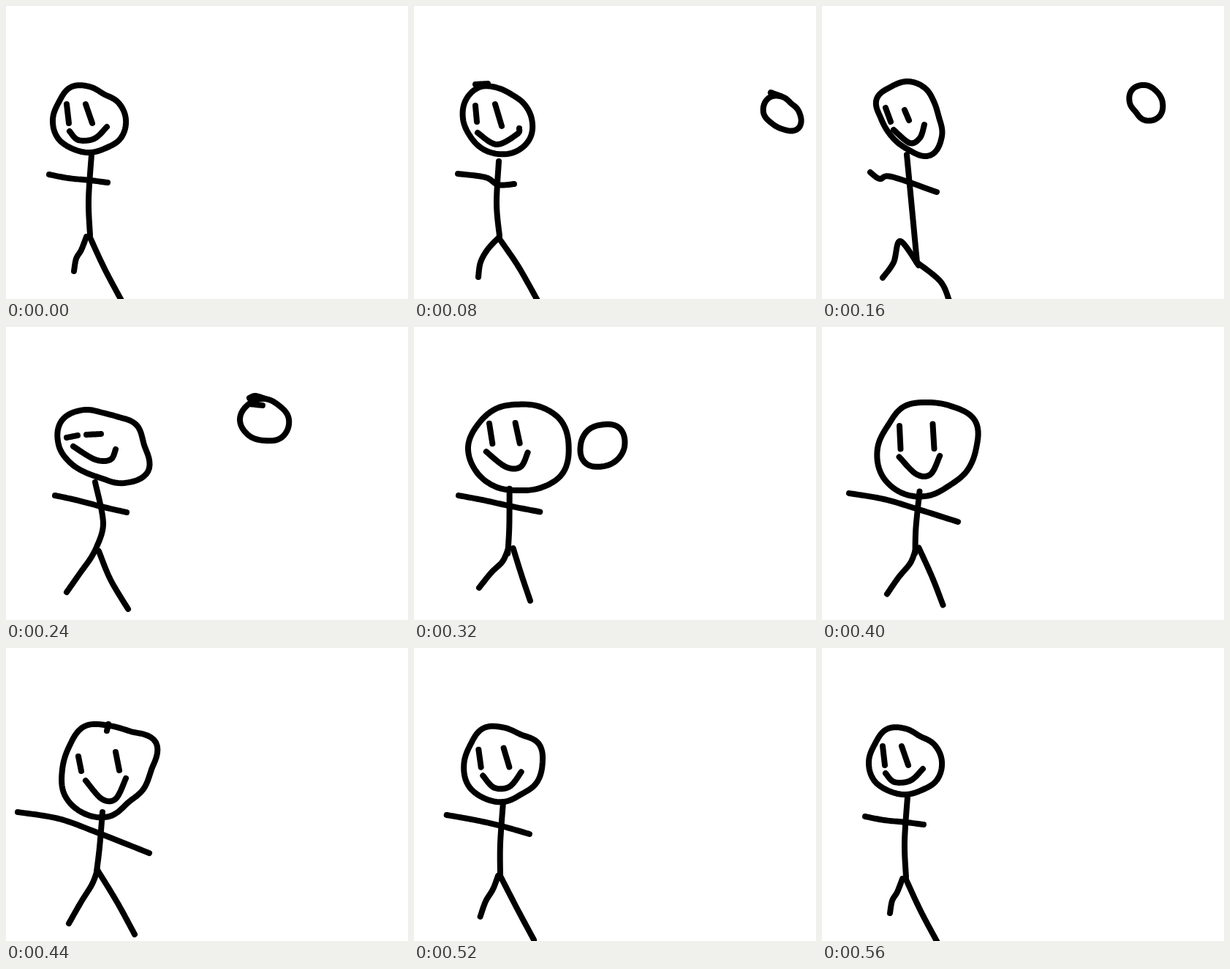
Animation of 550 by 400 pixels, one loop 1.2 s. Source, as an HTML page with a canvas:

```html
<!DOCTYPE html>
<html lang="en">
<head>
<meta charset="utf-8">
<title>Ball to the head</title>
<style>
html, body { margin: 0; width: 100%; height: 100%; overflow: hidden; background: #fff; }
canvas { display: block; width: 550px; height: 400px; }
</style>
</head>
<body>
<canvas id="stage" width="550" height="400"></canvas>
<script>
const LOOP = 1200, STEP = 40, END = 560;
const ctx = document.getElementById('stage').getContext('2d');

// Rings (head, ball, gasp): centre, then radii at equal angles, clockwise from the right.
// All other parts: the points of a smooth line.
const rest = {
  head: [114, 155, 50, 50, 45, 45, 46, 50, 50, 48, 51, 45, 40, 46],
  eyeL: [83, 134, 86, 160], eyeR: [109, 134, 118, 160],
  mouth: [87, 171, 99, 183, 121, 181, 138, 165],
  body: [117, 203, 113, 265, 115, 313],
  arms: [59, 230, 85, 235, 115, 238, 139, 241],
  legL: [110, 315, 103, 333, 96, 345, 93, 362],
  legR: [115, 316, 135, 359, 158, 402]
};
const ready = {
  head: [115, 154, 46, 51, 51, 48, 46, 45, 48, 51, 50, 42, 38, 41],
  eyeL: [84, 136, 86, 158], eyeR: [111, 134, 120, 164],
  mouth: [87, 173, 113, 189, 141, 175, 144, 167],
  body: [116, 212, 113, 270, 117, 314],
  arms: [60, 229, 98, 234, 115, 244, 137, 243],
  legL: [116, 316, 101, 332, 91, 350, 88, 370],
  legR: [117, 318, 143, 356, 169, 402],
  ball: [504, 145, 23, 31, 23, 21, 26, 27, 21, 17],
  marks: [[84, 107, 101, 106], [488, 118, 502, 123]]
};
const lean = {
  head: [118, 152, 42, 53, 60, 44, 36, 34, 38, 50, 48, 49, 46, 41],
  eyeL: [87, 139, 94, 158], eyeR: [113, 142, 119, 156],
  mouth: [98, 169, 120, 187, 134, 180, 140, 162],
  body: [116, 203, 123, 276, 130, 350],
  arms: [66, 227, 79, 236, 95, 233, 157, 254],
  legL: [132, 354, 107, 321, 98, 350, 83, 371],
  legR: [130, 350, 162, 376, 174, 402],
  ball: [442, 132, 24, 27, 24, 18, 21, 25, 24, 22]
};
const brace = {
  head: [132, 161, 57, 72, 60, 46, 44, 50, 60, 65, 55, 44, 44, 54],
  eyeL: [83, 151, 98, 148], eyeR: [110, 147, 130, 146],
  mouth: [92, 163, 122, 181, 143, 181, 150, 167],
  body: [122, 212, 133, 268, 123, 303],
  arms: [67, 230, 95, 236, 130, 245, 165, 253],
  legL: [123, 303, 115, 317, 102, 335, 83, 362],
  legR: [127, 306, 143, 345, 167, 385],
  ball: [354, 126, 33, 34, 29, 31, 34, 30, 28, 27],
  marks: [[333, 105, 351, 107], [333, 97, 341, 94, 355, 98]]
};
const hit = {
  head: [148, 165, 75, 70, 66, 66, 72, 75, 73, 62, 63, 65, 72, 76],
  eyeL: [113, 122, 112, 165], eyeR: [153, 123, 152, 165],
  body: [135, 225, 129, 275, 131, 312],
  arms: [58, 230, 97, 237, 136, 245, 176, 252],
  legL: [131, 305, 124, 322, 108, 335, 92, 353],
  legR: [140, 300, 149, 335, 155, 368],
  ball: [210, 178, 29, 26, 30, 36, 28, 27, 27, 35],
  gasp: [136, 185, 32, 32, 25, 31, 31, 27, 22, 24],
  marks: [[118, 110, 126, 100]]
};
const recoil = {
  head: [141, 166, 58, 54, 52, 64, 69, 70, 64, 63, 68, 60, 60, 74],
  eyeL: [99, 148, 103, 168], eyeR: [150, 142, 155, 167],
  mouth: [109, 181, 131, 206, 150, 206, 164, 178],
  body: [132, 224, 128, 272, 124, 305],
  arms: [16, 224, 72, 233, 125, 252, 196, 280],
  legL: [125, 303, 118, 322, 102, 348, 86, 376],
  legR: [125, 303, 152, 347, 176, 391],
  marks: [[138, 113, 140, 104]]
};
const [x, y, ...radii] = ready.ball;
const entry = { ball: [x + 45, y + 13, ...radii] };
const keys = [[0, rest], [40, entry], [80, ready], [160, lean], [240, brace],
  [360, hit], [440, recoil], [END, rest]];
const lines = ['eyeL', 'eyeR', 'mouth', 'body', 'arms', 'legL', 'legR'];

// Catmull-Rom value between b and c.
function spline(a, b, c, d, u) {
  return b + u / 2 * (c - a + u * (2 * a - 5 * b + 4 * c - d + u * (3 * (b - c) + d - a)));
}

function drawLine(flat) {
  const last = flat.length / 2 - 1;
  const at = (i, axis) => flat[2 * Math.max(0, Math.min(last, i)) + axis];
  const on = (i, u, axis) =>
    spline(at(i - 1, axis), at(i, axis), at(i + 1, axis), at(i + 2, axis), u);
  ctx.beginPath();
  for (let s = 0; s <= last * 12; s++) {
    const i = Math.floor(s / 12), u = s / 12 - i;
    ctx.lineTo(on(i, u, 0), on(i, u, 1));
  }
  ctx.stroke();
}

function drawRing([cx, cy, ...r], filled) {
  const n = r.length, at = i => r[(i + n) % n];
  ctx.beginPath();
  for (let s = 0; s < n * 8; s++) {
    const i = Math.floor(s / 8);
    const radius = spline(at(i - 1), at(i), at(i + 1), at(i + 2), s / 8 - i);
    const angle = s / 8 / n * 2 * Math.PI;
    ctx.lineTo(cx + radius * Math.cos(angle), cy + radius * Math.sin(angle));
  }
  ctx.closePath();
  if (filled) ctx.fill();
  ctx.stroke();
}

// Blend a part between the key poses around time t.
function partAt(name, t) {
  const track = keys.filter(([, pose]) => pose[name]);
  const next = track.findIndex(([time]) => time >= t);
  if (next < 0) return null;
  const [tb, b] = track[next];
  if (tb === t) return b[name];
  if (next === 0) return null;
  const [ta, a] = track[next - 1];
  const u = (t - ta) / (tb - ta);
  return a[name].map((v, i) => v + (b[name][i] - v) * u);
}

function draw(t) {
  ctx.fillStyle = '#fff';
  ctx.fillRect(0, 0, 550, 400);
  ctx.fillStyle = ctx.strokeStyle = '#000';
  ctx.lineWidth = 8;
  ctx.lineCap = ctx.lineJoin = 'round';

  const key = keys.find(([time]) => time === t);
  const { gasp, marks = [] } = key ? key[1] : {};
  const ball = partAt('ball', t);
  drawRing(partAt('head', t));
  if (ball) drawRing(ball);
  if (gasp) drawRing(gasp, true);
  for (const name of lines) {
    if (!(gasp && name === 'mouth')) drawLine(partAt(name, t));
  }
  marks.forEach(drawLine);
}

let shown = 0;
const start = performance.now();
function tick() {
  const t = Math.max(0, performance.now() - start) % LOOP;
  const step = Math.min(END, Math.floor(t / STEP) * STEP);
  if (step !== shown) draw(shown = step);
  requestAnimationFrame(tick);
}
draw(0);
requestAnimationFrame(tick);
</script>
</body>
</html>
```
